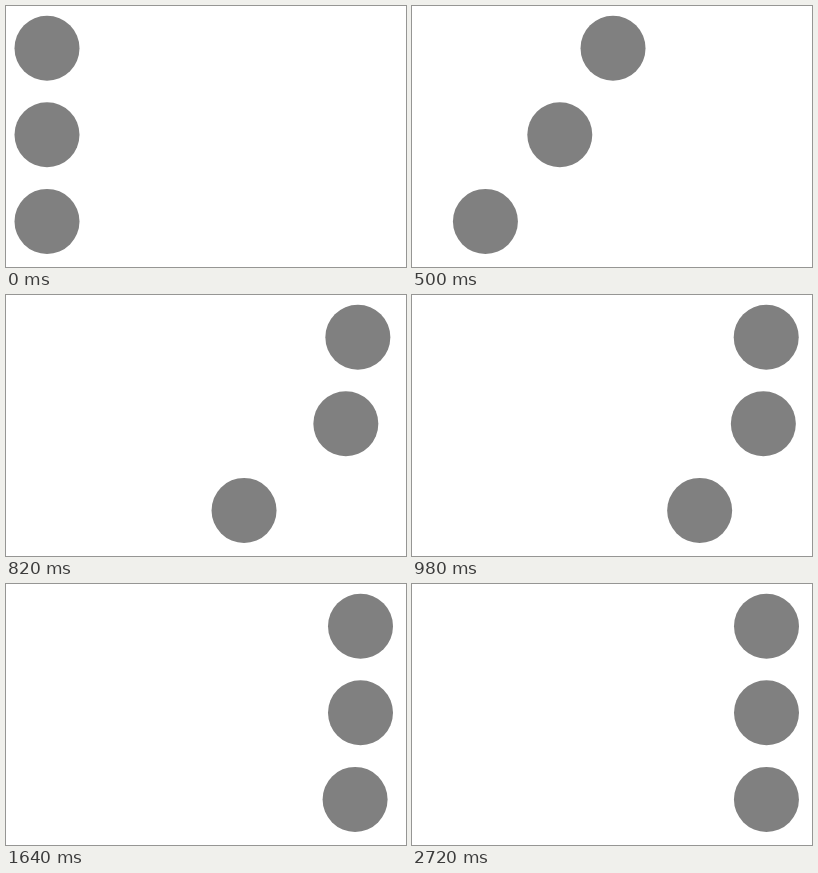
Recreate the animation shown at these times as an HTML page. Size 400 by 261 pixels, loop 2740 ms.

```html
<!DOCTYPE html>
<html lang="en">
<head>
<meta charset="utf-8">
<title>Spring comparison</title>
<style>
  html, body { margin: 0; width: 100%; height: 100%; overflow: hidden; background: #fff; }
  svg { display: block; width: 100vw; height: 100vh; }
</style>
</head>
<body>
<svg viewBox="0 0 400 261">
  <g fill="#808080">
    <circle cx="41" cy="42.2" r="32.5"/>
    <circle cx="41" cy="128.8" r="32.5"/>
    <circle cx="41" cy="215.4" r="32.5"/>
  </g>
</svg>
<script>
const LOOP = 2740, STEP = 20, DELAY = 393;
const FROM = 41, TO = 354.5;

// Distance left on a damped spring with decay rates a and b (per second).
const critical = w => s => (1 + w * s) * Math.exp(-w * s);
const overdamped = (a, b) => s => (b * Math.exp(-a * s) - a * Math.exp(-b * s)) / (b - a);

const springs = [critical(16), critical(11.3), overdamped(4, 6.5)];
const circles = document.querySelectorAll('circle');
const start = performance.now();

function draw() {
  const elapsed = (performance.now() - start) % LOOP;
  // A small tolerance keeps timer jitter from landing one step early.
  const time = Math.floor((elapsed + 2) / STEP) * STEP % LOOP;
  const seconds = Math.max(0, time - DELAY) / 1000;
  circles.forEach((circle, i) => {
    circle.setAttribute('cx', (TO - (TO - FROM) * springs[i](seconds)).toFixed(2));
  });
  requestAnimationFrame(draw);
}
draw();
</script>
</body>
</html>
```
